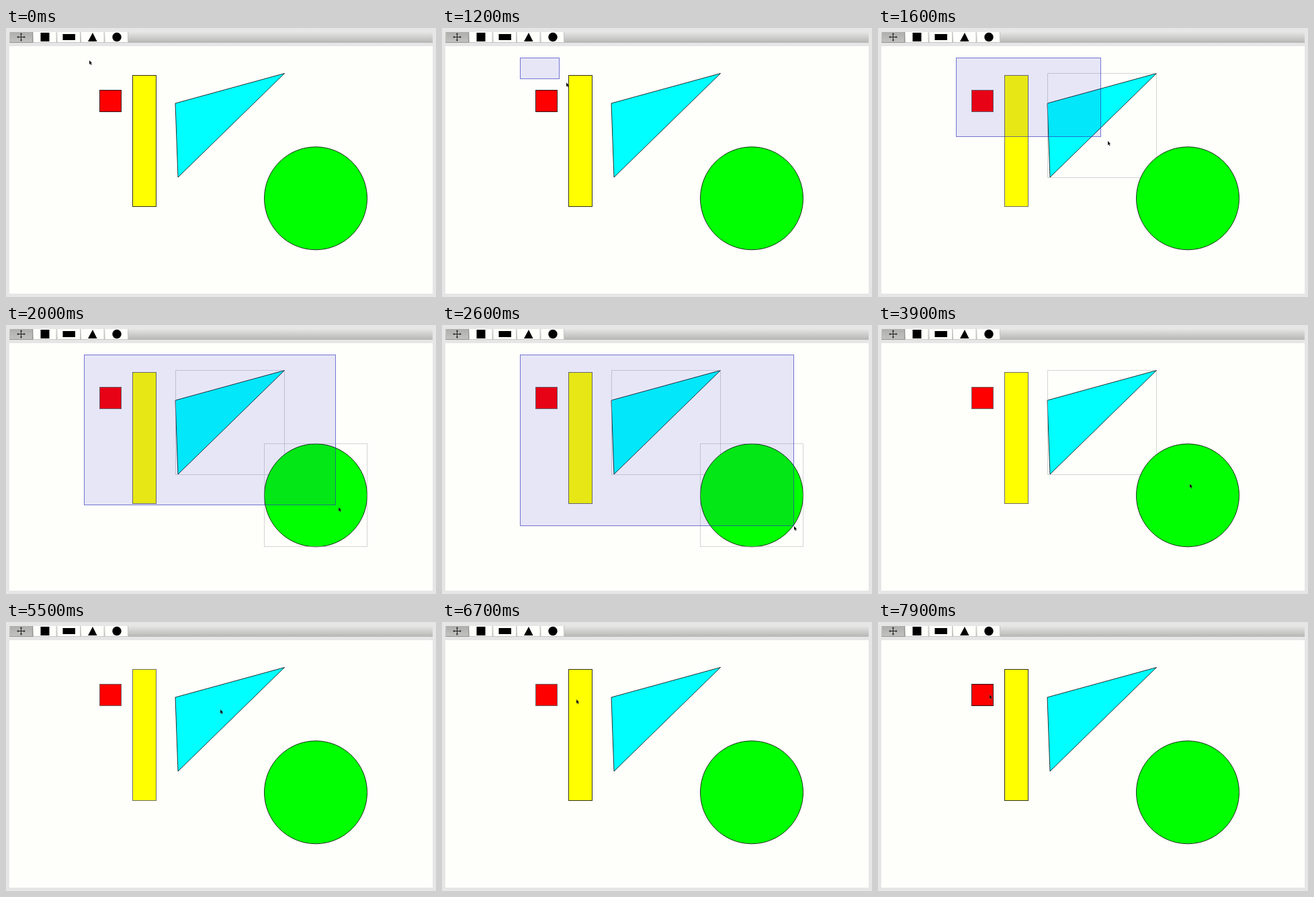
Animation of 640 by 400 pixels, one loop 8000 ms. Source, as an HTML page:

```html
<!DOCTYPE html>
<html lang="en">
<head>
<meta charset="utf-8">
<title>Shape selection</title>
<style>
  html, body { margin: 0; width: 100%; height: 100%; overflow: hidden; background: #e6e6e6; }
  svg { display: block; width: 640px; height: 400px; }
  .shape { stroke: rgba(0, 0, 0, .8); }
  .bounds { fill: none; stroke: #aaaaaa; stroke-dasharray: 1 1; }
</style>
</head>
<body>
<svg viewBox="0 0 640 400">
  <defs>
    <linearGradient id="bar" x2="0" y2="1">
      <stop offset="0" stop-color="#e8e8e8"/>
      <stop offset="1" stop-color="#b6b6b4"/>
    </linearGradient>
    <linearGradient id="pressed" x2="0" y2="1">
      <stop offset="0" stop-color="#aeaeac"/>
      <stop offset="1" stop-color="#c2c2c0"/>
    </linearGradient>
  </defs>
  <rect x="5" y="5" width="630" height="17" fill="url(#bar)"/>
  <rect x="5" y="27" width="630" height="368" fill="#fefefb"/>
  <g id="buttons"></g>
  <rect x="51.5" y="7" width="13" height="13"/>
  <rect x="84.5" y="9" width="18.5" height="9"/>
  <path d="M129 7L135.5 20H122Z"/>
  <circle cx="165" cy="13.5" r="6.7"/>
  <path d="M16.5 13.5H28.5M22.5 7.5V19.5M18 12V15M27 12V15M21 9H24M21 18H24" stroke="#222" fill="none"/>
  <g id="shapes"></g>
  <rect id="marquee" fill="rgba(20,20,200,.1)" stroke="rgba(50,50,190,.65)"/>
  <path id="cursor" d="M0 0V6.3L1.4 5.1L2.5 7.3L3.5 6.8L2.5 4.6H4.4Z" stroke="#fff" stroke-opacity=".45" stroke-width=".4"/>
</svg>
<script>
const LOOP = 8000, STEP = 100;
const RELEASE = 2700, DRAG_LAG = 28;

// Where the pointer rests or passes through, and when it arrives and leaves.
const stop = (x, y, arrive, leave = arrive) => ({ x, y, arrive, leave });
const press = stop(116, 44, 100, 300);
const stops = [
  stop(124, 48, 0),
  press,
  stop(124, 49, 600, 900),
  stop(342, 168, 1600),
  stop(495, 271, 2000),
  stop(524, 299, 2600),
  stop(492, 262, 3000, 3100),
  stop(464, 236, 3900, 4200),
  stop(324, 131, 5000, 5400),
  stop(201, 115, 6200, 6600),
  stop(166, 108, 7500, LOOP)
];

// Each shape is dropped from the selection when the pointer clicks it.
const shapes = [
  { tag: 'rect', fill: '#ff0000', box: [139, 92, 32, 32], deselect: 7500 },
  { tag: 'rect', fill: '#ffff00', box: [188, 70, 35, 195], deselect: 6400 },
  { tag: 'polygon', fill: '#00ffff', box: [252, 67, 162, 155], deselect: 5000,
    outline: { points: '252,112 414.5,67.5 256,222' } },
  { tag: 'circle', fill: '#00ff00', box: [384, 176, 153, 153], deselect: 3900,
    outline: { cx: 461, cy: 253.3, r: 76.5 } }
];

const byId = id => document.getElementById(id);
const show = (node, visible) => { node.style.display = visible ? '' : 'none'; };
const boxAttrs = ([x, y, width, height]) => ({ x: x + .5, y: y + .5, width, height });

function setAttrs(node, attrs) {
  for (const key in attrs) node.setAttribute(key, attrs[key]);
  return node;
}

function add(parent, tag, attrs) {
  const node = document.createElementNS('http://www.w3.org/2000/svg', tag);
  return parent.appendChild(setAttrs(node, attrs));
}

function buildScene() {
  const buttons = byId('buttons');
  for (let i = 0; i < 5; i++) {
    const x = 5.5 + i * 35.5;
    add(buttons, 'rect', { x, y: 6, width: 34, height: 15.5, fill: i ? '#fefefb' : 'url(#pressed)' });
    add(buttons, 'path', { d: `M${x} 21.5H${x + 34}V6`, fill: 'none', stroke: i ? '#c6c6c4' : '#949492' });
  }
  for (const shape of shapes) {
    const { tag, fill, box, outline = boxAttrs(box) } = shape;
    add(byId('shapes'), tag, { class: 'shape', fill, ...outline });
    shape.bounds = add(byId('shapes'), 'rect', { class: 'bounds', ...boxAttrs(box) });
  }
}

const slope = (a, b, axis) => a && b ? (b[axis] - a[axis]) / (b.arrive - a.leave) : 0;

// Speed while passing a stop: zero at rests and turns, else the harmonic mean.
function speedAt(i, axis) {
  const here = stops[i];
  const before = slope(stops[i - 1], here, axis), after = slope(here, stops[i + 1], axis);
  return here.leave > here.arrive || before * after <= 0 ? 0 : 2 * before * after / (before + after);
}

function pointerAt(t) {
  const next = stops.findIndex(s => s.arrive > t);
  const from = stops[next - 1] || stops[stops.length - 1], to = stops[next];
  if (!to || t <= from.leave) return [from.x, from.y];
  const span = to.arrive - from.leave, u = (t - from.leave) / span;
  return ['x', 'y'].map(axis => {
    const ease = u * u * (3 - 2 * u);
    const carry = speedAt(next - 1, axis) * u * (1 - u) ** 2 - speedAt(next, axis) * u * u * (1 - u);
    return Math.round(from[axis] + (to[axis] - from[axis]) * ease + carry * span);
  });
}

function render(t) {
  byId('cursor').setAttribute('transform', `translate(${pointerAt(t)})`);

  const dragging = t > press.leave && t < RELEASE;
  const [right, bottom] = pointerAt(Math.max(0, t - DRAG_LAG));
  show(byId('marquee'), dragging);
  if (dragging) {
    const width = right - press.x - 1, height = bottom - press.y - 1;
    setAttrs(byId('marquee'), boxAttrs([press.x, press.y, Math.max(0, width), Math.max(0, height)]));
  }

  for (const { box: [x, y], bounds, deselect } of shapes) {
    show(bounds, dragging ? right > x && bottom > y : t >= RELEASE && t < deselect);
  }
}

buildScene();
const origin = performance.now();
function tick() {
  const t = (performance.now() - origin) % LOOP;
  render(Math.floor(t / STEP) * STEP);
  requestAnimationFrame(tick);
}
tick();
</script>
</body>
</html>
```
